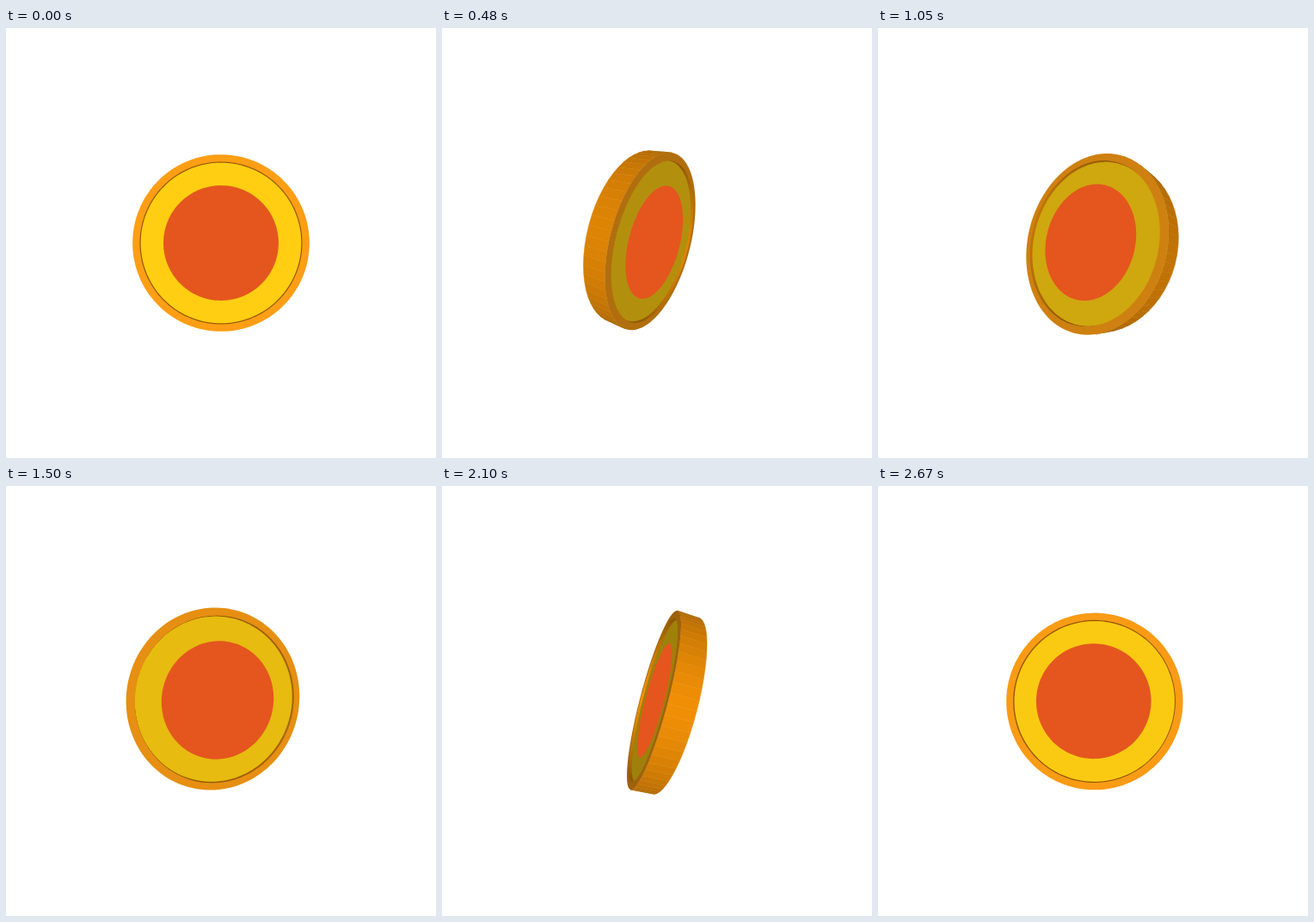
Animation of 500 by 500 pixels, one loop 2700 ms. Source, as an HTML page with a canvas:

```html
<!DOCTYPE html>
<html lang="en">
<head>
<meta charset="utf-8">
<title>Spinning coin</title>
<style>
  html, body { margin: 0; width: 100%; height: 100%; overflow: hidden; background: #fff; }
  canvas { display: block; width: 500px; height: 500px; }
</style>
</head>
<body>
<canvas id="stage" width="500" height="500"></canvas>
<script>
const ctx = document.getElementById('stage').getContext('2d');
const LOOP = 2700, STEP = 30;
const EYE = 290;                                  // camera distance
const TILT = 14.7 * Math.PI / 180;                // lean of the spin axis
const COIN = { r: 100, inner: 92, half: 11.9, recess: 4, mark: 66 };
const PIVOT = { w: 1.5, z: -3.9, v: -1.5 };       // spin axis is slightly off centre
const COLOR = {
  edge: [252, 150, 6], rim: [254, 158, 20], wall: [252, 152, 8],
  floor: [255, 206, 18], mark: 'rgb(228,86,30)'
};
const SIDES = 72;
const TURN = Math.PI * 2;
let sin = 0, cos = 1;

// Coin coordinates (w across, u along the axis, z thickness) to camera space
function place(w, u, z) {
  w += PIVOT.w;
  z += PIVOT.z;
  return [w * cos + z * sin + PIVOT.v, u, z * cos - w * sin];
}

function project([v, u, d]) {
  const s = EYE / (EYE - d), c = Math.cos(TILT), t = Math.sin(TILT);
  return [250 + (c * v + t * u) * s, 250 + (t * v - c * u) * s];
}

const facing = (n, p) => n[2] * EYE - (n[0] * p[0] + n[1] * p[1] + n[2] * p[2]) > 0;

// Light falls off with the angle between the surface and the viewer
function shade(color, nz) {
  const light = 1 - 0.27 * Math.acos(Math.min(1, Math.max(0, nz)));
  return `rgb(${color.map(c => Math.round(c * light)).join(',')})`;
}

const onRing = (r, a, z) => place(r * Math.cos(a), r * Math.sin(a), z);

function trace(points) {
  ctx.beginPath();
  points.forEach(p => ctx.lineTo(...project(p)));
  ctx.closePath();
}

function ring(r, z) {
  trace(Array.from({ length: SIDES * 2 }, (_, i) => onRing(r, i / SIDES / 2 * TURN, z)));
}

function disc(r, z, fill) {
  ring(r, z);
  ctx.fillStyle = fill;
  ctx.fill();
}

// Side of a cylinder; dir is 1 for the outside, -1 for the inside
function band(r, z1, z2, dir, color) {
  for (let i = 0; i < SIDES; i++) {
    const a = i / SIDES * TURN, b = (i + 1) / SIDES * TURN, m = (a + b) / 2;
    const n = [Math.cos(m) * cos, Math.sin(m), -Math.cos(m) * sin].map(x => x * dir);
    if (!facing(n, onRing(r, m, (z1 + z2) / 2))) continue;
    trace([onRing(r, a, z1), onRing(r, b, z1), onRing(r, b, z2), onRing(r, a, z2)]);
    ctx.fillStyle = ctx.strokeStyle = shade(color, n[2]);
    ctx.lineWidth = 0.5;
    ctx.fill();
    ctx.stroke();
  }
}

function face(side) {
  const top = side * COIN.half, low = side * (COIN.half - COIN.recess);
  const n = [side * sin, 0, side * cos];
  if (!facing(n, place(0, 0, top))) return;
  disc(COIN.r, top, shade(COLOR.rim, n[2]));
  ctx.save();
  ring(COIN.inner, top);
  ctx.clip();
  band(COIN.inner, top, low, -1, COLOR.wall);
  disc(COIN.inner, low, shade(COLOR.floor, n[2]));
  disc(COIN.mark, low, COLOR.mark);
  ctx.restore();
}

function draw(ms) {
  const angle = ms / LOOP * TURN;
  sin = Math.sin(angle);
  cos = Math.cos(angle);
  ctx.fillStyle = '#fff';
  ctx.fillRect(0, 0, 500, 500);
  band(COIN.r, COIN.half, -COIN.half, 1, COLOR.edge);
  face(1);
  face(-1);
}

const start = performance.now();
function tick() {
  const t = (performance.now() - start) % LOOP;
  draw(Math.floor(t / STEP) * STEP);
  requestAnimationFrame(tick);
}
tick();
</script>
</body>
</html>
```
